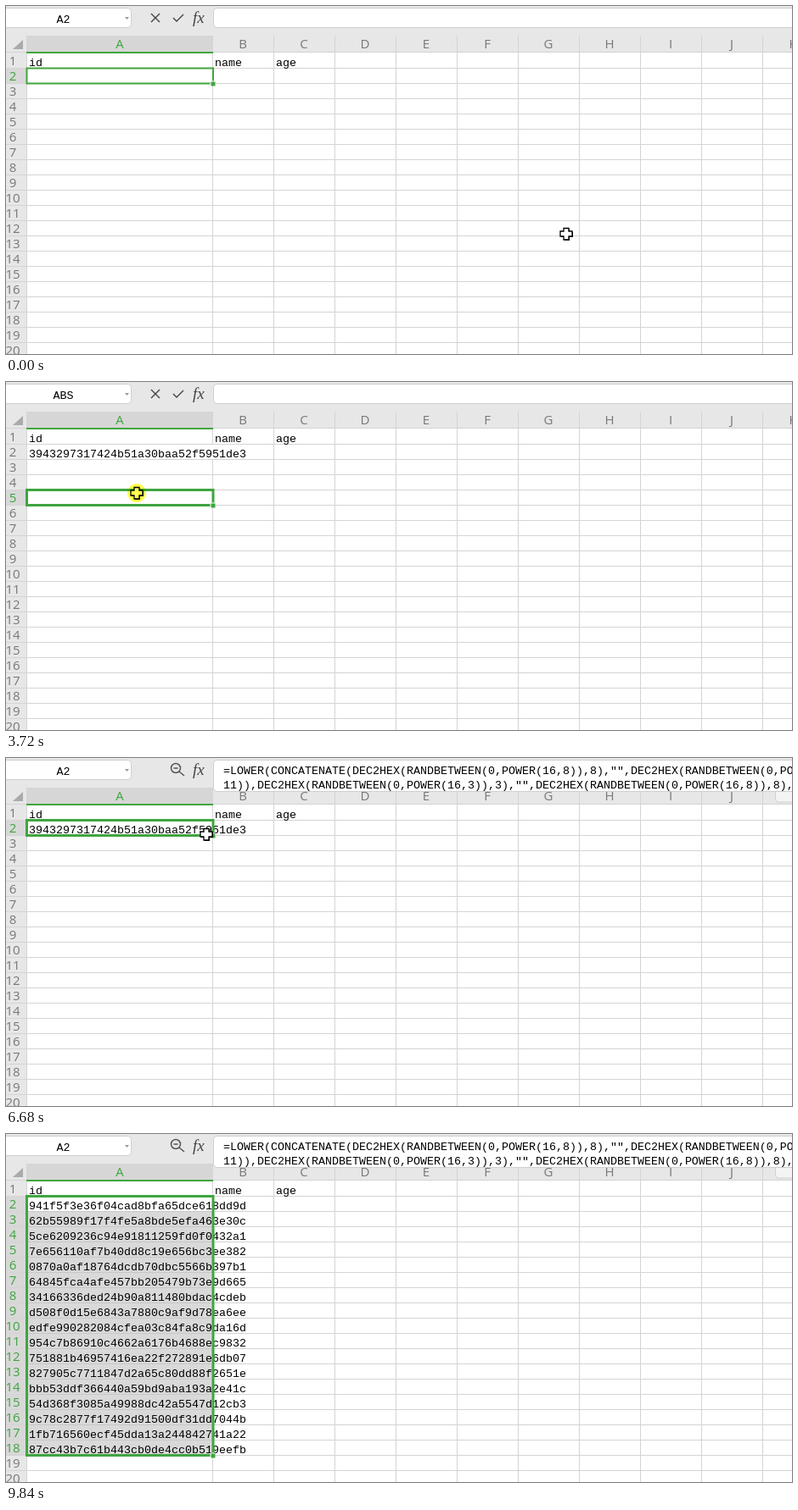
Recreate the animation shown at these times as an HTML page. Size 926 by 411 pixels, loop 9.92 s.

```html
<!DOCTYPE html>
<html lang="en">
<head>
<meta charset="utf-8">
<title>Spreadsheet fill</title>
<style>
  html, body { margin: 0; width: 100%; height: 100%; overflow: hidden; background: #fff; }
  svg { display: block; }
  .mono { font: 13.333px "Liberation Mono", monospace; fill: #000; white-space: pre; }
  .head { font: 15px "Open Sans", "Noto Sans", sans-serif; fill: #777; text-anchor: middle; }
  .head.on { fill: #3fa33f; }
  .glow { mix-blend-mode: multiply; }
</style>
</head>
<body>
<svg id="stage" width="926" height="411" viewBox="0 0 926 411"></svg>
<script>
const LOOP = 9920, TICK = 40;
const GREEN = '#3fa53f', GRID = '#d4d4d4', CHROME = '#e7e7e8';
const LEFT = 24, COL_B = 243, COL_W = 72, TOP = 55, ROW_H = 18, ROWS = 20;

const FORMULA = '=LOWER(CONCATENATE(DEC2HEX(RANDBETWEEN(0,POWER(16,8)),8),"",' +
  'DEC2HEX(RANDBETWEEN(0,POWER(16,4)),4),"","4",DEC2HEX(RANDBETWEEN(9,11)),' +
  'DEC2HEX(RANDBETWEEN(0,POWER(16,3)),3),"",DEC2HEX(RANDBETWEEN(0,POWER(16,8)),8),' +
  'DEC2HEX(RANDBETWEEN(0,POWER(16,4)),4)))';
const BAR_BREAK = FORMULA.indexOf('11))');
const CELL_BREAK = FORMULA.indexOf('OWER(16,3)');
const DEPTH_COLORS = ['#000', '#2a62c8', '#3c9a3c', '#a04ab0', '#e0442c'];

const FIRST_ID = '3943297317424b51a30baa52f5951de3';
const IDS = `941f5f3e36f04cad8bfa65dce618dd9d 62b55989f17f4fe5a8bde5efa463e30c
  5ce6209236c94e91811259fd0f0432a1 7e656110af7b40dd8c19e656bc3ee382
  0870a0af18764dcdb70dbc5566b397b1 64845fca4afe457bb205479b73e9d665
  34166336ded24b90a811480bdac4cdeb d508f0d15e6843a7880c9af9d78ea6ee
  edfe990282084cfea03c84fa8c9da16d 954c7b86910c4662a6176b4688ec9832
  751881b46957416ea22f272891e6db07 827905c7711847d2a65c80dd88f2651e
  bbb53ddf366440a59bd9aba193a2e41c 54d368f3085a49988dc42a5547d12cb3
  9c78c2877f17492d91500df31dd7044b 1fb716560ecf45dda13a244842741a22
  87cc43b7c61b443cb0de4cc0b519eefb`.split(/\s+/);

// Moments of the story, in ms
const PASTE = 2560, COMMIT = 3720, RELEASE = 3800, SELECT = 4240,
      DRAG = 7920, DROP = 8760, FILLED = 8840, HINT_END = 9840;

// Pointer path: [time, x, y]
const PATH = [
  [0, 660, 269], [320, 330, 90], [480, 200, 30], [760, 109, 105], [880, 109, 105],
  [1000, 110, 93], [1120, 110, 93], [1400, 190, 60], [1760, 281, 10], [2840, 281, 10],
  [3480, 154, 131], [RELEASE, 154, 131], [4160, 180, 84], [4320, 180, 84], [4640, 241, 90],
  [4720, 240, 88], [5240, 240, 88], [5280, 241, 88], [5360, 245, 98], [5480, 241, 82],
  [5760, 241, 82], [5800, 244, 96], [5880, 241, 84], [6240, 241, 84], [6280, 237, 100],
  [6360, 241, 86], [6520, 241, 86], [6680, 236, 90], [6800, 236, 101], [6960, 239, 87],
  [7160, 239, 87], [7360, 244, 91], [7880, 244, 91], [8600, 202, 376], [FILLED, 202, 376],
  [9320, 779, 430]
];
const PRESSES = [[1920, 2080], [COMMIT, RELEASE], [SELECT, 4320], [DRAG, DROP]];

const within = (t, a, b) => t >= a && t < b;
const rowTop = r => TOP + ROW_H * (r - 1);
const rowAt = y => Math.floor((y - TOP) / ROW_H) + 1;
const escape = s => s.replace(/</g, '&lt;');

const rect = (x, y, w, h, fill, extra = '') =>
  `<rect x="${x}" y="${y}" width="${w}" height="${h}" fill="${fill}" ${extra}/>`;
const path = (d, stroke, width = 1, extra = '') =>
  `<path d="${d}" fill="none" stroke="${stroke}" stroke-width="${width}" ${extra}/>`;
const mono = (x, y, s) => `<text class="mono" x="${x}" y="${y}">${s}</text>`;
const head = (x, y, s, on) => `<text class="head${on ? ' on' : ''}" x="${x}" y="${y}">${s}</text>`;
const cell = (x, r, s) => mono(x, rowTop(r) + 16, s);

// Marks each bracket with the colour of its nesting depth
function colorize(text) {
  let depth = 0;
  return [...text].map(c => {
    if (c === ')') depth--;
    const color = DEPTH_COLORS[depth];
    if (c === '(') depth++;
    return '()'.includes(c) ? `<tspan fill="${color}">${c}</tspan>` : escape(c);
  });
}
const PLAIN = [...FORMULA], COLORED = colorize(FORMULA);

function formulaLines(chars, split, x, y, step) {
  return mono(x, y, chars.slice(0, split).join('')) +
    mono(x, y + step, chars.slice(split).join(''));
}

function pointerAt(t) {
  const i = PATH.findIndex(k => k[0] > t);
  if (i < 0) return PATH[PATH.length - 1].slice(1);
  const [t0, x0, y0] = PATH[i - 1], [t1, x1, y1] = PATH[i];
  const u = (t - t0) / (t1 - t0);
  return [Math.round(x0 + (x1 - x0) * u), Math.round(y0 + (y1 - y0) * u)];
}

function sheet(first, last) {
  let s = rect(0, 0, 926, TOP, CHROME) + rect(0, TOP, LEFT, 356, CHROME);
  s += rect(LEFT, 35, COL_B - LEFT, 20, '#d6d6d6');
  s += rect(0, rowTop(first), LEFT, ROW_H * (last - first + 1), '#d8d8d8');
  s += '<path d="M20 40V51H8Z" fill="#aaa"/>';

  let lines = `M0 ${TOP - .5}H926M${LEFT + .5} 35V411`;
  for (let x = COL_B + .5; x < 926; x += COL_W) lines += `M${x} 35V411`;
  for (let r = 1; r <= ROWS; r++) lines += `M0 ${rowTop(r + 1) + .5}H926`;
  s += path(lines, GRID);

  s += head(134, 50, 'A', true);
  [...'BCDEFGHIJK'].forEach((c, i) => s += head(COL_B + COL_W * (i + .5), 50, c));
  for (let r = 1; r <= ROWS; r++) s += head(8, rowTop(r) + 15, r, r >= first && r <= last);
  return s + rect(LEFT, 54, 220, 2, GREEN) +
    cell(27, 1, 'id') + cell(246, 1, 'name') + cell(318, 1, 'age');
}

function selection(first, last, width) {
  const y = rowTop(first), bottom = rowTop(last + 1);
  return path(`M24.5 ${y + .5}H244V${bottom + .5}H24.5Z`, GREEN, width) +
    rect(240.5, bottom - 2.5, 6, 6, '#fff') + rect(241.5, bottom - 1.5, 5, 5, GREEN);
}

function toolbar(name, editing, expanded, chars) {
  const border = 'stroke="#cfcfcf"';
  let s = rect(-8, 2.5, 155.5, 23, '#fff', border + ' rx="4"');
  s += mono(67.5 - name.length * 4, 20, name);
  s += '<path d="M140 13h5l-2.5 3z" fill="#999"/>';
  s += editing
    ? path('M171 9l10 10M181 9l-10 10M197 14l4 4 8-8', '#444', 1.4)
    : path('M205.500 12a5.500 5.500 0 1 0-11 0a5.500 5.500 0 1 0 11 0M197.500 12h5M204 16l6 5', '#555', 1.5);
  s += '<text x="220" y="20" font-family="Liberation Serif, serif" font-style="italic" font-size="19" fill="#444">fx</text>';
  if (expanded) {
    s += rect(906.5, 32, 40, 20, '#f4f4f4', border + ' rx="4"');
    s += rect(244.5, 2.5, 700, 37, '#fff', border + ' rx="4"');
    s += formulaLines(chars, BAR_BREAK, 256, 19, 17);
  } else {
    s += rect(244.5, 2.5, 700, 23, '#fff', border + ' rx="4"');
  }
  return s;
}

// Dotted outline that follows the pointer while the cell is dragged down
function dragOutline(last) {
  const bottom = rowTop(last + 1);
  const tinted = path('M24 74H244V92', '#b55fbd', 3);
  if (last <= 2) return tinted;
  return tinted +
    path(`M25 93V${bottom + .5}H243.500V93`, '#000', 2, 'stroke-dasharray="1 1"');
}

function fillHint() {
  return rect(247.5, 383.5, 30, 21, '#fff', 'stroke="#b8b8b8" rx="2"') +
    path('M252.500 388.500h10v11h-10zM252.500 392.500h10M257.500 388.500v11', '#777') +
    path('M260 400h6M263 397v6', GREEN, 2) +
    '<path d="M268 393h6l-3 4z" fill="#666"/>';
}

function pointer(x, y, kind, pressed) {
  const plus = 'M-3-6.500h6v3.500h4v6h-4v4h-6v-4h-4v-6h4z';
  const shapes = {
    cross: `<path d="${plus}" transform="translate(1 1)"/>` +
      `<path d="${plus}" fill="#fff" stroke="#000" stroke-width="1.3"/>`,
    beam: path('M-3-7.500h2.500l.5 1 .5-1h2.500M0-7V7M-3 7.500h2.500l.5-1 .5 1h2.500', '#222', 1.1),
    thin: path('M-6 0H6M0-6V6', '#000', 2)
  };
  const glow = pressed ? '<circle class="glow" r="11" fill="#ffff50"/>' : '';
  return `<g transform="translate(${x} ${y})">${shapes[kind]}${glow}</g>`;
}

function render(t) {
  const [x, y] = pointerAt(t);
  const typing = t < COMMIT, typed = within(t, PASTE, COMMIT);
  const filled = t >= FILLED, dragging = within(t, DRAG, FILLED);
  const first = within(t, COMMIT, SELECT) ? 5 : 2;
  const last = filled ? 18 : first;
  const name = typing ? 'A2' : t < RELEASE ? 'ABS' : 'A' + first;

  let s = sheet(first, last);
  if (filled) s += rect(25, rowTop(3), 218, ROW_H * 16, '#d9d9d9') +
    path(Array.from({ length: 16 }, (_, i) => `M25 ${rowTop(i + 3) + .5}H243`).join(''), '#c8c8c8');
  const values = filled ? IDS : typing ? [] : [FIRST_ID];
  values.forEach((id, i) => {
    s += rect(COL_B, rowTop(i + 2) + 1, 1, ROW_H - 1, '#fff') + cell(27, i + 2, id);
  });
  s += selection(first, last, typing ? 2 : 3);
  if (typed) s += rect(25.5, 74.5, 901, 34.5, '#fff') + path('M25 109.500H926', GRID) +
    formulaLines(COLORED, CELL_BREAK, 27, 89, ROW_H);
  if (dragging) s += dragOutline(Math.max(2, rowAt(y)));
  if (within(t, FILLED, HINT_END)) s += fillHint();

  s += toolbar(name, t < RELEASE, typed || t >= SELECT, typed ? COLORED : PLAIN);
  const kind = within(t, 7360, FILLED) ? 'thin' : x > 244 && y < 26 ? 'beam' : 'cross';
  s += pointer(x, y, kind, PRESSES.some(([a, b]) => within(t, a, b)));
  stage.innerHTML = s;
}

const stage = document.getElementById('stage');
const start = performance.now();
let shown = -1;
function frame(now) {
  const t = Math.floor(Math.max(0, now - start) % LOOP / TICK) * TICK;
  if (t !== shown) render(shown = t);
  requestAnimationFrame(frame);
}
render(0);
requestAnimationFrame(frame);
</script>
</body>
</html>
```
